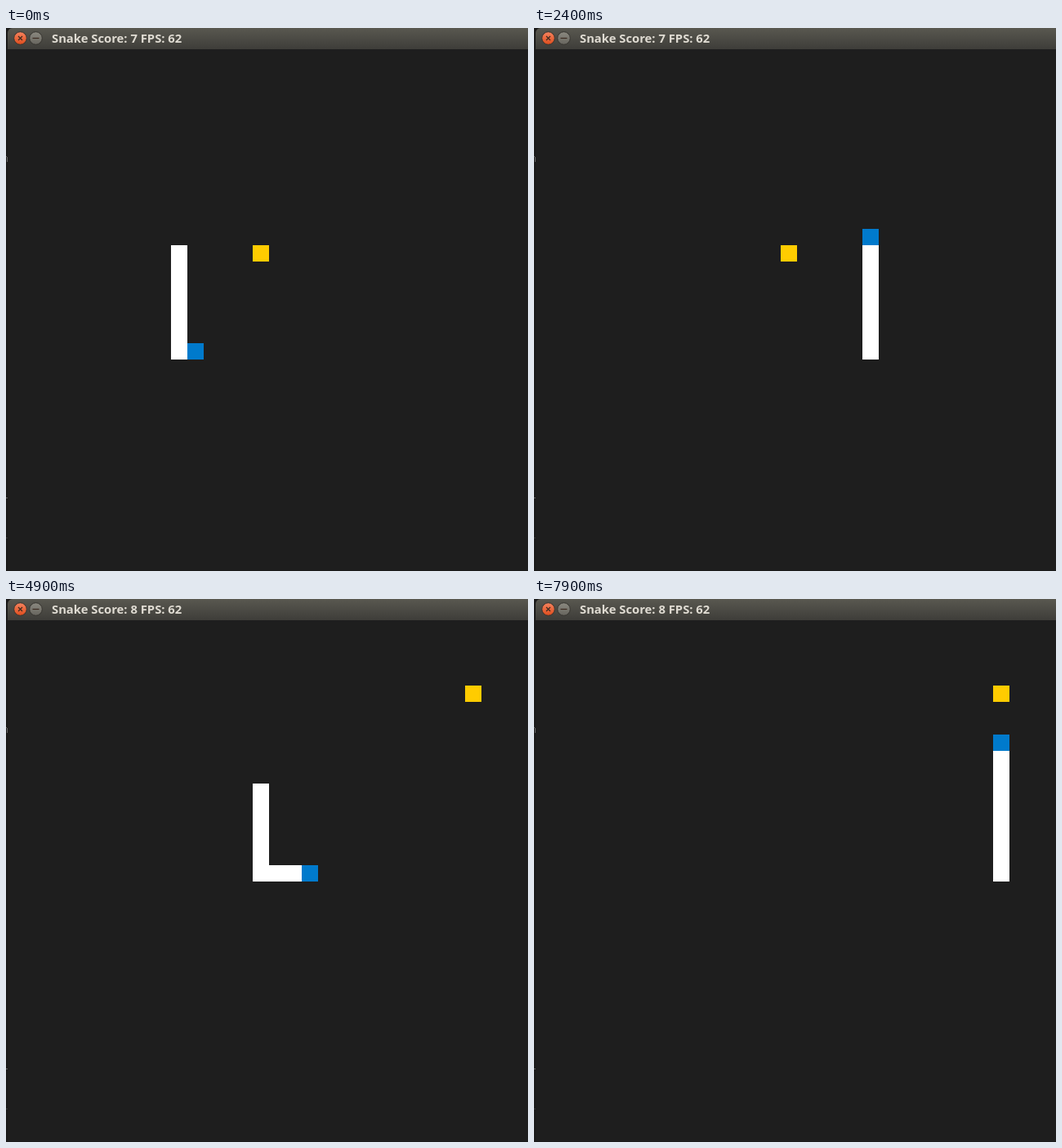
Recreate the animation shown at these times as an HTML page with a canvas. Size 639x665 px, loop 8000 ms.

```html
<!DOCTYPE html>
<html lang="en">
<head>
<meta charset="utf-8">
<title>Snake</title>
<style>
  html, body { margin: 0; width: 100%; height: 100%; overflow: hidden; background: #1a1a1a; }
  canvas { display: block; }
</style>
</head>
<body>
<canvas id="stage" width="639" height="665"></canvas>
<script>
const ctx = document.getElementById('stage').getContext('2d');
const LOOP = 8000, CELL = 20, LEFT = 2, TOP = 26;

// Corners of the snake's route, in grid cells
const corners = [[10, 12], [10, 18], [20, 18], [20, 10], [15, 10], [15, 15], [28, 15], [28, 7]];
const route = [corners[0]];
for (const [col, row] of corners.slice(1)) {
  let [c, r] = route.at(-1);
  while (c !== col || r !== row) {
    c += Math.sign(col - c);
    r += Math.sign(row - r);
    route.push([c, r]);
  }
}

// Moves in tenths of a second; a repeated time is a double move
const moveTimes = [
  1, 3, 4, 6, 7, 9, 10, 12, 13, 14, 16, 17, 19, 20, 22, 23, 27, 27, 28, 30, 31,
  34, 36, 38, 39, 41, 43, 45, 47, 49, 51, 52, 53, 56, 58, 59, 60, 61,
  64, 66, 67, 69, 70, 71, 73, 74, 76, 79
];
const START_HEAD = 7, MEAL = 31;

function square([col, row], color) {
  ctx.fillStyle = color;
  ctx.fillRect(LEFT + col * CELL, TOP + row * CELL, CELL, CELL);
}

function verticalGradient(y0, y1, from, to) {
  const gradient = ctx.createLinearGradient(0, y0, 0, y1);
  gradient.addColorStop(0, from);
  gradient.addColorStop(1, to);
  return gradient;
}

function button(x, light, dark, glyph) {
  const y = 12.5;
  ctx.beginPath();
  ctx.arc(x, y, 7.8, 0, Math.PI * 2);
  ctx.fillStyle = verticalGradient(y - 8, y + 8, light, dark);
  ctx.fill();
  ctx.lineWidth = 1;
  ctx.strokeStyle = '#35332e';
  ctx.stroke();
  ctx.beginPath();
  for (const [x0, y0, x1, y1] of glyph) {
    ctx.moveTo(x + x0, y + y0);
    ctx.lineTo(x + x1, y + y1);
  }
  ctx.lineWidth = 1.2;
  ctx.strokeStyle = '#3c2a20';
  ctx.stroke();
}

function drawWindow(title) {
  ctx.fillStyle = '#1a1a1a';
  ctx.fillRect(0, 0, 639, 665);
  ctx.fillStyle = '#686868';
  ctx.fillRect(0, 157, 1, 1);
  ctx.fillRect(1, 158, 1, 6);
  ctx.fillRect(0, 575, 2, 1);
  ctx.fillStyle = '#3a3a3a';
  ctx.fillRect(0, 624, 2, 1);

  ctx.fillStyle = '#1e1e1e';
  ctx.fillRect(LEFT, TOP, 637, 638);
  ctx.beginPath();
  ctx.roundRect(LEFT, 0, 645, TOP, [6, 0, 0, 0]);
  ctx.fillStyle = verticalGradient(0, TOP, '#595850', '#3e3d39');
  ctx.fill();

  button(17.5, '#f58460', '#de4c1c', [[-2.5, -2.5, 2.5, 2.5], [2.5, -2.5, -2.5, 2.5]]);
  button(36.5, '#8c8a81', '#66645d', [[-4, 0, 4, 0]]);

  ctx.font = 'bold 14.8px "Open Sans", "Noto Sans", sans-serif';
  ctx.fillStyle = '#dfdbd2';
  ctx.fillText(title, 56, 18);
}

function draw(now) {
  const t = now % LOOP;
  const head = START_HEAD + moveTimes.filter(time => time * 100 <= t).length;
  const eaten = head >= MEAL;
  const score = t >= 4400 ? 8 : 7;
  const fps = (t >= 1400 && t < 2400) || (t >= 6400 && t < 7400) ? 63 : 62;

  drawWindow(`Snake Score: ${score} FPS: ${fps}`);
  square(eaten ? [28, 4] : [15, 12], '#ffcc00');
  route.slice(head - (eaten ? 8 : 7), head).forEach(cell => square(cell, '#ffffff'));
  square(route[head], '#007acc');
}

let start;
function tick(now) {
  start ??= now;
  draw(now - start);
  requestAnimationFrame(tick);
}
draw(0);
requestAnimationFrame(tick);
</script>
</body>
</html>
```
